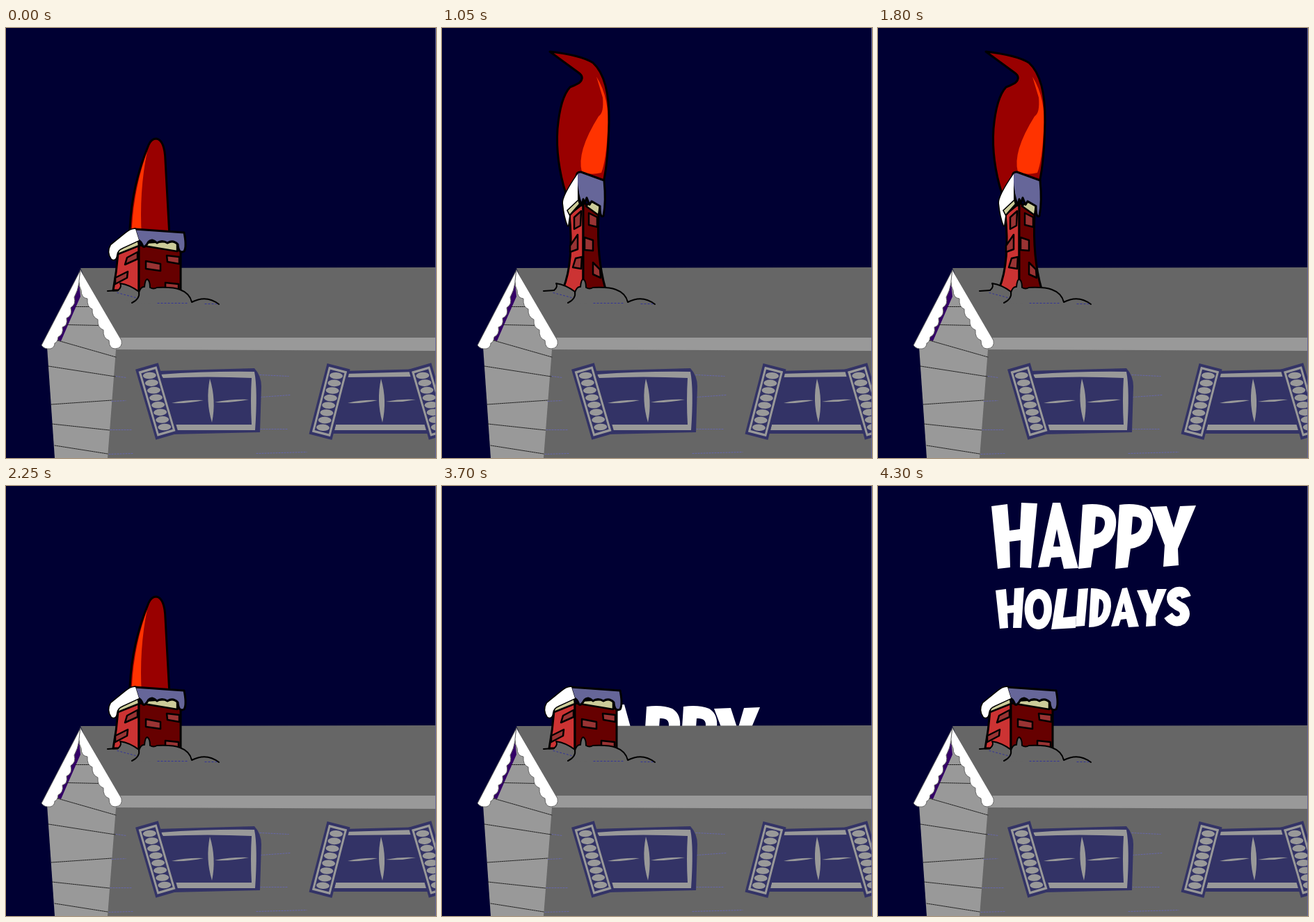
An HTML page with a canvas for the animation above (4450 ms loop, 618x618 px).

```html
<!DOCTYPE html>
<html lang="en">
<head>
<meta charset="utf-8">
<title>Happy Holidays</title>
<style>
html, body { margin: 0; width: 100%; height: 100%; overflow: hidden; background: #000033; }
canvas { display: block; width: 100vw; height: 100vh; }
</style>
</head>
<body>
<canvas id="stage" width="618" height="618" role="img" aria-label="Happy Holidays"></canvas>
<script>
const ctx = document.getElementById('stage').getContext('2d');
const LOOP = 4450, STEP = 50;
const SKY = '#000033', DARK = '#666666', LIGHT = '#999999', PANE = '#333366', SHADE = '#666699';

const same = (x, y) => [x, y];

// Moves every "x,y" pair of a path through a point mapping.
const warp = (d, map) => d.replace(/(-?[\d.]+),(-?[\d.]+)/g, (_, x, y) => map(+x, +y).join());

function shape(d, fill, line = 0, map = same, color = '#000') {
  const p = new Path2D(map === same ? d : warp(d, map));
  if (fill) { ctx.fillStyle = fill; ctx.fill(p, 'evenodd'); }
  if (line) { ctx.strokeStyle = color; ctx.lineWidth = line; ctx.stroke(p); }
}

const HAT = {
  body: 'M178,300 L178,288 Q181,225 205,168 Q209,159 216,159 Q228,161 229,190 L235,300 Z',
  glow: 'M181,300 L181,286 Q184,230 203,177 Q191,235 195,300 Z'
};
const CURL = {
  body: 'M178,238 Q163,190 166,145 Q170,100 184,85 Q190,83 197,79 Q206,71 196,64 L155,34 Q200,39 217,50 Q241,72 240,135 Q239,190 232,222 L197,212 Z',
  glow: 'M222,70 Q242,102 238,148 Q236,190 229,208 Q214,212 201,207 Q193,178 225,127 Q233,122 231,100 Z'
};

const REST = {
  left: 'M161,324 L191,312 L191,384 L161,377 L154,377 Q159,350 161,324 Z',
  right: 'M191,312 L251,320 L251,384 L191,384 Z',
  bricks: [
    'M174,330 L189,322 L189,332 L171,340 Z', 'M157,359 L175,350 L174,359 L157,368 Z',
    'M201,335 L222,339 L222,349 L201,346 Z', 'M231,327 L249,329 L249,339 L232,336 Z',
    'M229,366 L248,368 L248,377 L229,375 Z'],
  trim: ['M161,319 L190,305 L191,313 L161,325 Z', 'M196,309 L246,306 L246,321 L198,313 Z'],
  white: 'M186,289 Q180,288 172,295 L151,312 Q145,322 152,332 Q158,335 159,326 Q160,319 167,316 L191,305 Z',
  cap: 'M185,289 L256,294 Q260,314 256,321 Q248,325 247,311 Q240,304 232,309 Q224,304 217,309 Q210,302 205,307 Q200,316 197,314 Q194,306 190,305 Z'
};
const MID = {
  left: 'M171,307 L203,297 L202,384 L165,378 L147,378 Q172,357 171,307 Z',
  right: 'M203,297 L241,311 Q238,356 245,371 L263,383 L202,384 Z',
  bricks: [
    'M183,313 L202,304 L201,313 L181,322 Z', 'M170,336 L188,326 L188,337 L169,345 Z',
    'M180,351 L199,347 L199,356 L179,357 Z', 'M217,305 L235,307 L235,318 L217,316 Z',
    'M206,328 L223,330 L225,342 L206,340 Z', 'M228,354 L237,357 L243,367 L228,365 Z'],
  trim: ['M165,301 L190,290 L193,296 L169,308 Z', 'M206,297 L220,292 L240,297 L237,306 Z'],
  white: 'M188,267 L157,289 Q154,296 163,312 Q168,321 172,315 L165,303 Q178,294 191,291 Z',
  cap: 'M186,269 Q188,265 193,266 L250,273 Q256,275 253,303 Q250,309 241,307 Q239,295 226,297 L218,292 L214,296 L210,290 L206,297 L203,291 L198,306 Q191,289 186,269 Z'
};
const TALL = {
  left: 'M183,268 L203,252 L203,384 L174,375 Q190,335 183,268 Z',
  right: 'M203,250 L225,268 Q222,330 235,375 L203,384 Z',
  bricks: [
    'M190,272 L200,263 L199,284 L190,289 Z', 'M184,313 L195,297 L195,318 L184,322 Z',
    'M192,331 L201,329 L200,346 L188,344 Z', 'M211,266 L223,272 L223,286 L211,283 Z',
    'M205,301 L217,305 L217,320 L205,319 Z', 'M217,337 L227,347 L228,359 L217,354 Z'],
  trim: ['M179,262 L196,246 L198,253 L183,270 Z', 'M207,256 L214,249 L227,255 L225,269 Z'],
  white: 'M195,210 Q173,242 174,252 Q176,272 181,284 L183,270 L179,262 L195,247 Z',
  cap: 'M193,214 Q193,206 200,207 L233,219 Q236,250 232,270 Q227,274 227,256 L215,249 L212,254 L208,244 L205,252 L203,246 L201,255 Q194,240 193,214 Z'
};

const lift = dy => (x, y) => [x, y + dy];
const stretch = (top, k) => (x, y) => [206 + (x - 206) * .95, top + (y - 159) * k];
const flatten = (x, y) => {
  const up = Math.min(1, Math.max(0, (378 - y) / 60));
  return [204 + (x - 204) * (1.1 + .55 * up), 378 - (378 - y) * .68];
};

const POSES = {
  rest: { stack: REST, hat: HAT },
  mid: { stack: MID, hat: HAT, hatMap: lift(-24) },
  squash: { stack: REST, hat: HAT, map: flatten, hatMap: flatten },
  tall: { stack: TALL, hat: HAT, hatMap: stretch(47, 1.35) },
  over: { stack: TALL, hat: HAT, hatMap: stretch(19, 1.54) },
  up: { stack: TALL, hat: CURL }
};

// One bounce: start time of each pose; the bounce repeats every 750 ms.
const BOUNCE = [[600, 'up'], [550, 'over'], [500, 'tall'], [400, 'mid'],
  [300, 'rest'], [200, 'squash'], [100, 'rest'], [0, 'mid']];

function poseAt(t) {
  if (t >= 3250) {
    const sunk = Math.floor((t - 3250) / STEP);
    return { stack: REST, hat: sunk < 6 ? HAT : null, hatMap: lift(sunk * 22.5) };
  }
  if (t >= 3150) return POSES.mid;
  if (t >= 2550) return POSES.up;
  const u = (t + 300) % 750;
  return POSES[BOUNCE.find(([from]) => u >= from)[1]];
}

const P = 'M294,27 Q316,24 331,30 Q344,38 342,57 Q339,86 310,90 L306,117 L288,119 Z M313,44 Q327,43 326,55 Q324,68 311,70 Z';
const HAPPY = [
  'M163,29 L186,26 L189,64 L204,62 L206,24 L229,25 L220,118 L204,117 L205,78 L189,80 L190,117 L172,119 Z',
  'M251,24 L262,24 L288,118 L267,119 L263,102 L249,103 L246,116 L230,117 Z M257,62 L262,87 L252,87 Z',
  P, warp(P, (x, y) => [x + 53, y]),
  'M391,30 L415,29 L425,60 L434,29 L457,28 L431,90 L432,114 L410,116 L412,85 Z'];
const HOLIDAYS = [
  'M169,150 L184,148 L186,172 L195,171 L196,147 L210,146 L206,204 L194,204 L195,182 L186,183 L187,204 L175,205 Z',
  'M231,148 C257,148 256,206 231,206 C204,206 204,148 231,148 Z M231,162 C220,162 220,192 231,192 C241,192 241,162 231,162 Z',
  'M258,148 L272,147 L266,189 L285,187 L284,204 L249,206 Z',
  'M288,148 L302,147 L297,201 L284,202 Z',
  'M306,147 Q336,146 335,173 Q333,203 303,203 Z M318,162 Q325,164 324,175 Q322,188 316,189 Z',
  'M351,147 L358,146 L375,202 L360,203 L357,191 L349,192 L346,201 L335,202 Z M353,168 L356,181 L350,181 Z',
  'M372,150 L387,149 L394,170 L401,148 L415,148 L399,187 L399,201 L385,202 L386,184 Z'];
const LETTER_S = 'M443,160 Q440,150 430,152 Q418,157 424,167 Q430,172 437,175 Q445,184 437,192 Q426,199 417,186';

function greeting(t) {
  if (t < 3700) return;
  const n = Math.floor((t - 3700) / STEP);
  const first = lift(n < 10 ? 290 - 33.7 * n : 0);
  const second = lift(n < 12 ? Math.max(4, 290 - 27.8 * n) : 0);
  HAPPY.forEach(d => shape(d, '#fff', 0, first));
  HOLIDAYS.forEach(d => shape(d, '#fff', 0, second));
  ctx.lineCap = 'butt';
  shape(LETTER_S, null, 14, second, '#fff');
  ctx.lineCap = 'round';
}

function hat({ hat, hatMap }) {
  if (!hat) return;
  shape(hat.body, '#990000', 0, hatMap);
  shape(hat.glow, '#ff3300', 0, hatMap);
  shape(hat.body, null, 3, hatMap);
}

function chimney({ stack, map }) {
  shape(stack.left, '#cc3333', 3, map);
  shape(stack.right, '#660000', 3, map);
  stack.bricks.forEach(d => shape(d, '#993333', 2.5, map));
  stack.trim.forEach(d => shape(d, '#cccc99', 2.5, map));
  shape(stack.white, '#fff', 3, map);
  shape(stack.cap, SHADE, 3, map);
  shape(stack.white, '#fff', 0, map);
}

function dotted(d, color, gap) {
  ctx.setLineDash([2, gap]);
  shape(d, null, 1, same, color);
  ctx.setLineDash([]);
}

function drift() {
  const left = 'M161,377 Q167,372 164,367 Q178,369 191,379 Q193,389 181,395';
  const right = 'M191,380 Q194,371 199,372 Q200,361 203,361 Q207,363 207,373 Q212,376 217,373 Q240,372 250,376 Q264,381 267,394';
  shape(left + ' L161,386 Z', DARK);
  shape(right + ' L189,396 Z', DARK);
  dotted('M160,380.5 L190,388.5 M218,395.5 L262,395.5 M286,396.5 L303,396.5', '#333399', 3);
  shape('M146,378 L161,377', null, 2);
  shape(left, null, 2);
  shape(right + ' Q288,383 306,397', null, 2);
}

function leaf(x1, y1, x2, y2, w) {
  const mx = (x1 + x2) / 2, my = (y1 + y2) / 2, len = Math.hypot(x2 - x1, y2 - y1);
  const nx = (y1 - y2) / len * w, ny = (x2 - x1) / len * w;
  shape(`M${x1},${y1} Q${mx + nx},${my + ny} ${x2},${y2} Q${mx - nx},${my - ny} ${x1},${y1} Z`, LIGHT);
}

function shutter(x, y, deg) {
  const tilt = deg * Math.PI / 180;
  ctx.save();
  ctx.translate(x, y);
  ctx.rotate(tilt);
  [[34, 105, PANE], [27, 97, LIGHT], [21, 90, PANE]].forEach(([w, h, color]) => {
    ctx.fillStyle = color;
    ctx.fillRect(-w / 2, -h / 2, w, h);
  });
  ctx.fillStyle = LIGHT;
  // Slats stay nearly level while the frame leans.
  for (let i = 0; i < 8; i++) {
    ctx.beginPath();
    ctx.ellipse(0, (i - 3.5) * 11, 9.5, 4.8, -tilt * .8, 0, 7);
    ctx.fill();
  }
  ctx.restore();
}

function windows() {
  shape('M215,493 L357,489 Q367,500 367,515 L365,581 L238,584 Z', PANE);
  shape('M222,498 Q290,493 357,494 Q362,520 358,578 L240,578 L243,570 L353,570 Q351,535 353,503 Q290,500 226,503 Z', LIGHT);
  leaf(293, 504, 296, 567, 8);
  leaf(238, 539, 284, 535, 3);
  leaf(300, 538, 349, 534, 3);
  shutter(217, 536.5, -16.2);

  shape('M485,493 L600,490 L617,583 L465,583 Z', PANE);
  shape('M488,497 L590,494 L590,501 L486,502 Z M474,570 L604,570 L604,578 L472,578 Z', LIGHT);
  leaf(539, 504, 541, 567, 8);
  leaf(491, 539, 534, 535, 3);
  leaf(546, 537, 589, 534, 3);
  shutter(465, 537, 14.4);
  shutter(609.5, 536.5, -16.2);
}

function house() {
  shape('M107,345 L618,344 L618,618 L140,618 L157,462 Z', DARK);
  shape('M163,445 L618,445 L618,464 L158,462 Z', LIGHT);
  shape('M107,360 L59,458 L70,618 L146,618 L158,462 Z', LIGHT);
  shape('M105,366 L73,448 L79,450 Q92,420 107,386 Z', '#330066');

  dotted('M100,400.5 L120,400.5 M88,426.5 L134,427.5 M74,449 L158,473 M61,486 L157,501 M65,541 L152,535 M66,569 L149,578 M70,600 L146,612', '#222', 1);
  dotted('M158,500.5 L173,502.5 M365,498.5 L406,500.5 M152,536.5 L172,535.5 M366,530.5 L408,527.5 M150,577.5 L181,577.5 M366,576.5 L404,576.5 M148,612.5 L182,611.5 M360,611.5 L432,609.5', '#6666aa', 2);

  shape('M107,348 L51,456 Q55,462 64,461 Q70,459 70,453 Q74,452 75,444 Q83,440 81,430 Q89,428 87,417 Q96,413 93,402 Q101,397 98,387 Q103,378 105,366 Z', '#fff', 1, same, DARK);
  shape('M107,348 L166,449 Q168,460 157,461 Q148,461 148,449 Q139,446 140,434 Q131,431 132,419 Q123,415 124,404 Q116,401 117,389 Q108,388 108,377 Q105,372 105,364 Z', '#fff', 1, same, DARK);
  windows();
}

function draw(t) {
  const pose = poseAt(t);
  ctx.fillStyle = SKY;
  ctx.fillRect(0, 0, 618, 618);
  greeting(t);
  hat(pose);
  house();
  chimney(pose);
  drift();
  ctx.fillStyle = SHADE;
  ctx.fillRect(617, 0, 1, 618);
}

ctx.lineJoin = ctx.lineCap = 'round';
const start = performance.now();
function tick() {
  draw((performance.now() - start) % LOOP);
  requestAnimationFrame(tick);
}
tick();
</script>
</body>
</html>
```
